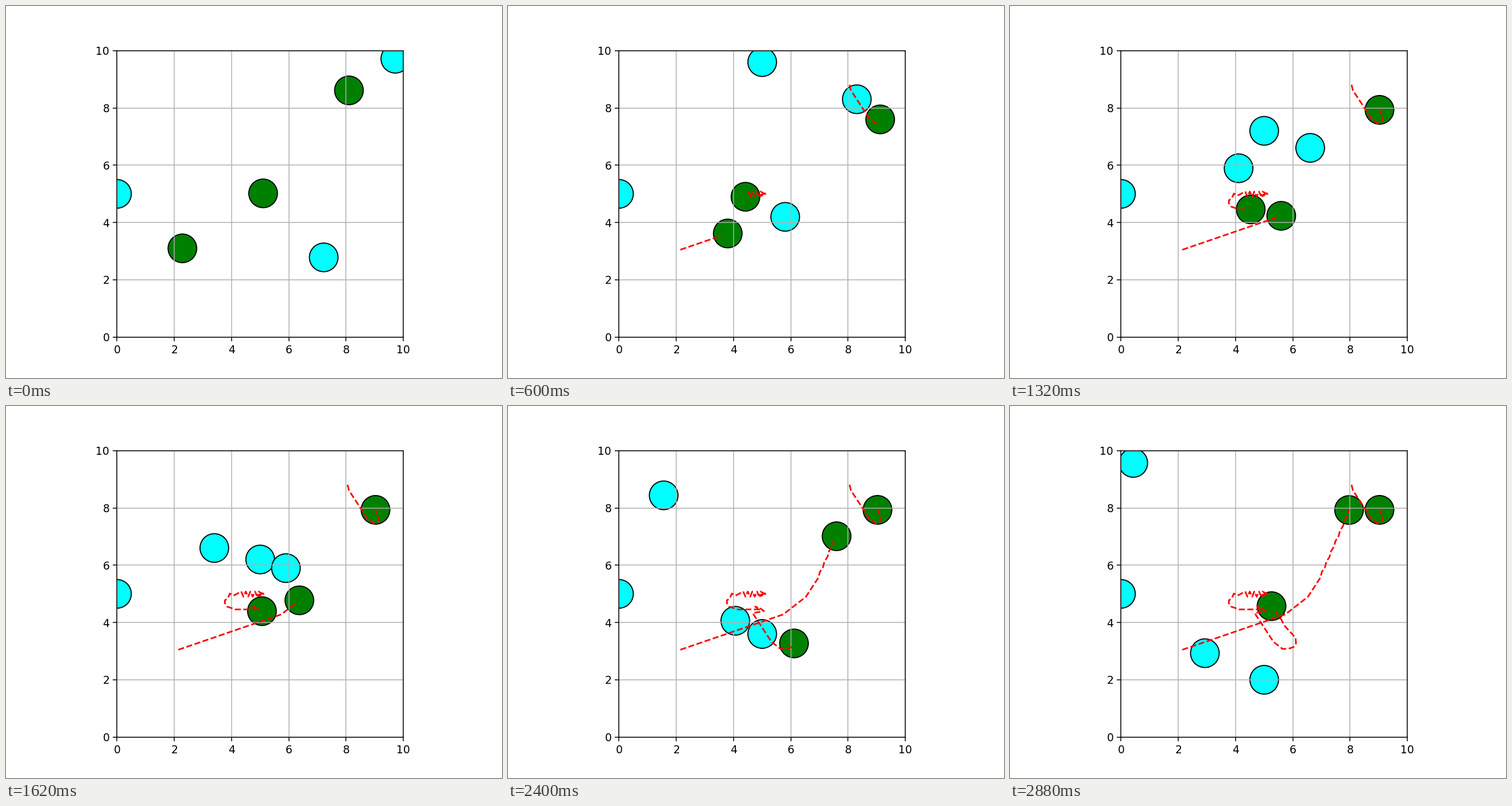
Animation of 864 by 648 pixels, one loop 2940 ms. Source, as a matplotlib script:

```python
import numpy as np
import matplotlib.pyplot as plt
from matplotlib.animation import FuncAnimation
from matplotlib.patches import Circle

DT = 0.1
STEPS = 50
RADIUS = 0.5
VMAX = 2.0
CLEARANCE = 2.2 * RADIUS

# Obstacles: start, speed, heading
OBSTACLES = [((5, 12), 2, -np.pi / 2),
             ((0, 5), 0, 0),
             ((10, 10), 2, -np.pi * 3 / 4),
             ((7.5, 2.5), 2, np.pi * 3 / 4)]
# Robots: start, goal
ROBOTS = [((5, 5), (5, 5)),
          ((2, 3), (8, 8)),
          ((8, 9), (9, 8))]

# Candidate velocities on a polar grid, one row per sample
speeds, angles = np.meshgrid(np.linspace(0, VMAX, 5), np.linspace(0, 2 * np.pi, 20))
SAMPLES = np.column_stack([(speeds * np.cos(angles)).ravel(),
                           (speeds * np.sin(angles)).ravel()])


def obstacle_path(start, speed, heading):
    vel = speed * np.array([np.cos(heading), np.sin(heading)])
    t = DT * np.arange(1, STEPS + 1)
    return np.array(start, float) + t[:, None] * vel, vel


def side(angle, rel):
    """Signed distance of rel from the line through the origin at angle."""
    return np.cos(angle) * rel[:, 1] - np.sin(angle) * rel[:, 0]


def desired_velocity(pos, goal):
    gap = goal - pos
    dist = np.hypot(*gap)
    if dist < RADIUS / 5 - 1e-6:
        return np.zeros(2)
    return VMAX * gap / dist


def choose_velocity(pos, goal, obstacles):
    """Sample closest to the desired velocity outside all velocity obstacles."""
    free = np.ones(len(SAMPLES), bool)
    for centre, vel in obstacles:
        disp = pos - centre
        theta = np.arctan2(disp[1], disp[0])
        phi = np.arcsin(CLEARANCE / max(np.hypot(*disp), CLEARANCE))
        rel = SAMPLES - vel
        free &= ~((side(theta + phi, rel) > 0) & (side(theta - phi, rel) < 0))
    options = SAMPLES[free] if free.any() else np.zeros((1, 2))
    cost = np.linalg.norm(options - desired_velocity(pos, goal), axis=1)
    return options[np.argmin(np.round(cost, 9))]


def robot_path(start, goal, obstacles):
    pos, goal = np.array(start, float), np.array(goal, float)
    path = []
    for i in range(STEPS):
        now = [(track[i], vel) for track, vel in obstacles]
        pos = pos + DT * choose_velocity(pos, goal, now)
        path.append(pos)
    return np.array(path)


obstacles = [obstacle_path(*o) for o in OBSTACLES]
robot_paths = [robot_path(*r, obstacles) for r in ROBOTS]

fig = plt.figure(figsize=(6.4, 4.8), dpi=135)
ax = fig.add_subplot(111, aspect="equal", xlim=(0, 10), ylim=(0, 10))
ax.grid(True)


def add_disc(color):
    return ax.add_patch(Circle((0, 0), RADIUS, facecolor=color, edgecolor="black"))


discs = [(add_disc("green"), path) for path in robot_paths]
discs += [(add_disc("cyan"), track) for track, _ in obstacles]
trails = [(ax.plot([], [], "--r")[0], path) for path in robot_paths]


def update(frame):
    for disc, path in discs:
        disc.center = path[frame + 1]
    for line, path in trails:
        line.set_data(*path[:frame + 1].T)
    return [d for d, _ in discs] + [l for l, _ in trails]


anim = FuncAnimation(fig, update, frames=STEPS - 1, interval=60,
                     repeat=True, repeat_delay=0)
plt.show()
```
